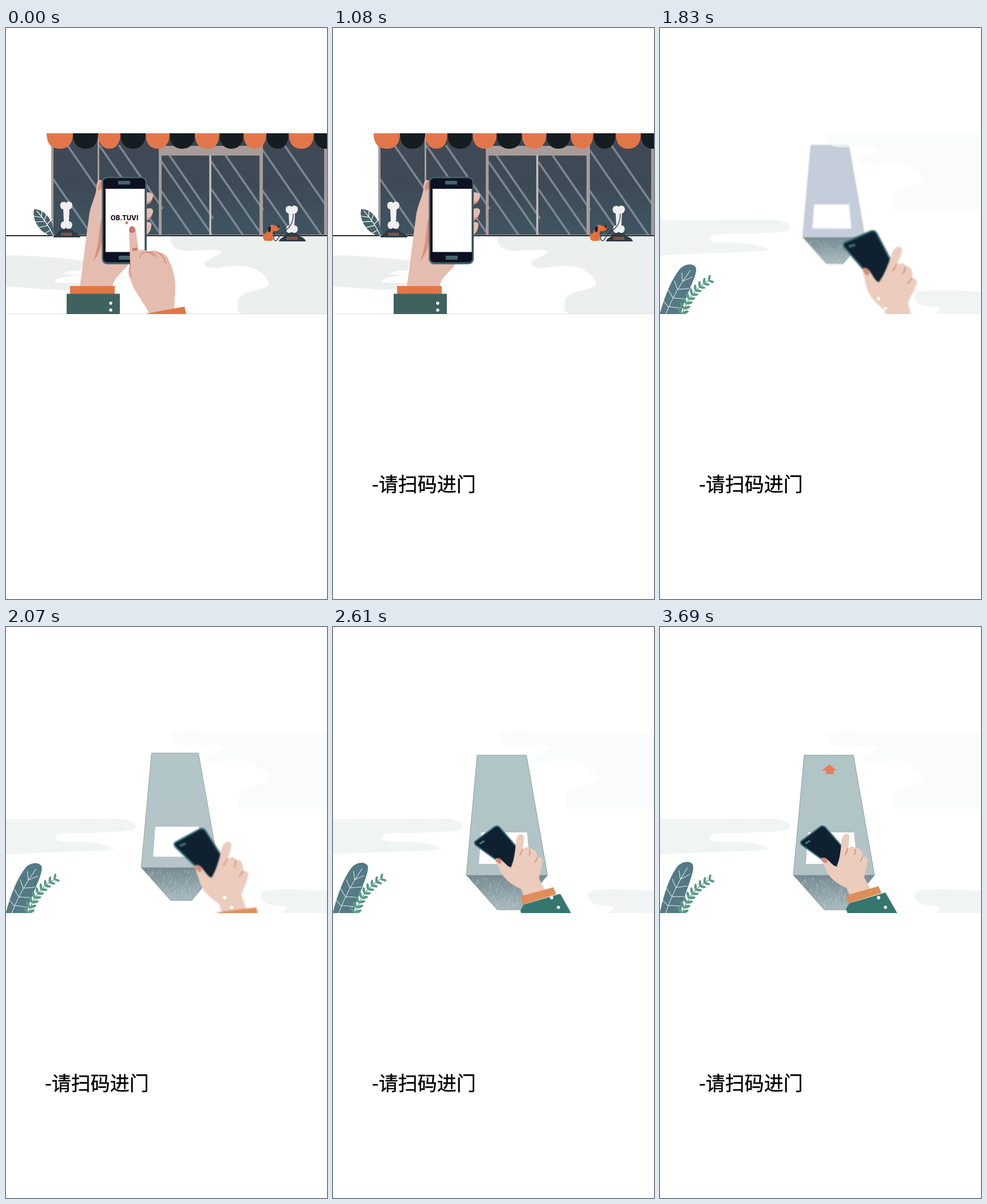
Animation, 561 px wide and 998 px high, one loop 3720 ms. Source, as an HTML page:

```html
<!DOCTYPE html>
<html lang="zh">
<head>
<meta charset="utf-8">
<style>
html, body { margin: 0; height: 100%; overflow: hidden; background: #fff; }
svg { display: block; }
.line { fill: none; stroke-linecap: round; stroke-linejoin: round; }
.skin { fill: #e5bcb0; }
.crease { stroke: #d48b76; stroke-width: 1.6; }
.cloud { fill: #eef4f3; fill-opacity: .85; }
#caption { font: 400 34px "Noto Sans CJK SC", "Noto Sans CJK", sans-serif; stroke: #000; stroke-width: .4; }
#brand { font: 800 11.5px Inter, sans-serif; text-anchor: middle; fill: #1b1214; }
.sign { font: 700 6.3px "Liberation Sans", sans-serif; text-anchor: middle; fill: #e2764a; }
</style>
</head>
<body>
<svg width="561" height="998" viewBox="0 0 561 998">
<defs>
  <clipPath id="view"><path d="M0 184H561V500H0Z"/></clipPath>
  <clipPath id="glass"><path d="M83 184H160V361H83ZM163 184H267V361H163ZM272 223H355V361H272ZM359 223H443V361H359ZM449 184H556V361H449Z"/></clipPath>
  <linearGradient id="pane" x2="0" y2="1"><stop stop-color="#414955"/><stop offset=".5" stop-color="#3d4a55"/><stop offset="1" stop-color="#3f5562"/></linearGradient>
  <linearGradient id="top" x2="0" y2="1"><stop stop-color="#b0c5c6"/><stop offset="1" stop-color="#b2c3c6"/></linearGradient>
  <linearGradient id="front" x2="0" y2="1"><stop stop-color="#768b91"/><stop offset="1" stop-color="#a4b8bd"/></linearGradient>
  <g id="stand">
    <path fill="#f0f0f2" d="M100 317C93 316 93 304 100 304Q104 303 105 306Q107 302 112 304C118 305 117 316 111 317L110 338C118 338 117 350 111 351Q107 352 105 349Q102 353 98 350C94 348 95 338 101 338Z"/>
    <path fill="#303b46" d="M83 366C84 360 91 360 92 356C95 350 100 354 104 350C110 352 116 351 119 357C123 358 129 361 130 366Z"/>
    <text class="sign" x="106" y="363">DOGS</text>
  </g>
</defs>

<g clip-path="url(#view)">
  <g id="shop">
    <path fill="#ebf0ee" d="M0 397C50 398 100 402 137 407L130 424C108 424 100 428 100 430C114 432 122 431 130 432C100 434 85 438 85 442C88 447 115 445 132 446L129 457C80 460 40 453 0 452ZM288 364C286 380 296 390 318 390C340 388 365 386 375 390C382 394 350 404 346 410C343 417 360 421 372 419C395 415 430 412 445 428C455 432 462 446 458 450C445 460 425 458 411 468C400 475 408 490 403 493L412 499H561V364Z"/>
    <path stroke="#ddd" d="M0 499.5H561"/>
    <path fill="#a79c9b" d="M79 184H561V362H79Z"/>
    <path fill="#39444f" d="M271 184H447V206H271Z"/>
    <g clip-path="url(#glass)">
      <path fill="url(#pane)" d="M79 184H561V362H79Z"/>
      <path id="shine" class="line" stroke="#7d8793" stroke-width="3.6"/>
    </g>
    <path class="line" stroke="#d0cfd0" stroke-width="1.6" d="M357 223V361"/>
    <path stroke="#25282d" stroke-width="1.8" d="M0 363H561"/>
    <g id="awning"></g>
    <g id="shrub">
      <path fill="#4a636a" d="M85 364C64 364 44 338 49 317C70 316 84 340 85 364Z"/>
      <path class="line" stroke="#fff" stroke-width="1.2" d="M54 320Q72 340 83 363M62 330L63 318M67 336L72 322M72 343L80 334M63 331L49 329M68 338L51 339M73 345L57 349M78 353L66 360"/>
    </g>
    <use href="#stand"/>
    <use href="#stand" x="394" y="7"/>
    <path class="line" stroke="#303b46" stroke-width="1.4" d="M502 325C502 350 488 352 481 360S474 374 469 371S475 358 465 352"/>
    <g id="dog">
      <path fill="#e2713f" d="M459 348C462 342 470 344 472 347C477 344 481 347 478 351C476 355 471 356 467 355C463 360 470 366 465 372H453C448 369 448 362 453 359C458 356 456 352 459 348Z"/>
      <path fill="#1b2227" d="M462 346C458 346 456 352 459 357C463 358 464 350 462 346ZM474 345C479 344 480 349 476 350Z"/>
      <path class="line" stroke="#e2713f" stroke-width="1.6" d="M454 365Q448 365 450 359"/>
    </g>

    <g class="skin">
      <path d="M240 289C249 285 259 288 257 294C256 302 250 306 240 309ZM240 319C249 313 258 314 257 321C256 329 250 333 240 336ZM240 341C248 337 256 339 254 346C253 354 250 361 240 363Z"/>
      <path d="M129 452C134 420 138 380 145 330C147 310 157 295 158 280C158 269 162 264 166 266C170 268 169 275 168 290L172 408H217C208 425 190 432 186 452Z"/>
    </g>
    <path fill="#d9917c" d="M168 334C160 345 167 372 152 408C165 394 170 372 170 350ZM246 304Q254 302 256 298Q254 306 246 309ZM246 332Q253 331 255 327Q253 334 246 337ZM162 285C158 280 163 268 168 267V280Z"/>
    <path fill="#e27746" d="M112 451H190V466H112Z"/>
    <path fill="#40625f" d="M106 464.500H199V500H106Z"/>
    <g fill="#fff"><circle cx="183" cy="481" r="2.700"/><circle cx="183" cy="493" r="2.700"/></g>
    <rect x="167.500" y="260" width="78.500" height="153" rx="9" fill="#41656a"/>
    <rect x="170" y="262.500" width="73.500" height="147" rx="7" fill="#0e1122"/>
    <path fill="#fff" d="M174 281H242.500V391.500H174Z"/>
    <path fill="#436569" d="M196 267H217V273.500H196ZM197 398H218V405H197Z"/>
    <g id="splash">
      <text id="brand" x="207" y="336">OB.TUVI</text>
      <circle cx="211" cy="340.500" r="2.500" fill="#e27746"/>
    </g>
    <g id="pointer">
      <path class="skin" d="M215 354C214 344 226 343 227 354L232 389C240 386 247 389 249 391C258 387 264 389 266 392C276 392 284 400 285 407C292 420 296 438 296 452L294 492L251 500C240 478 222 458 218 440C212 432 214 420 217 412Z"/>
      <path fill="#c9766a" d="M215.500 356C214 344 225 344 226 355Q221 361 215.500 356Z"/>
      <path fill="#d07c66" d="M220.500 385L229 383.500L230 389L221.500 390Z"/>
      <path class="line crease" d="M234 402C236 389 249 389 258 398M248 391Q258 391 263 400M264 392Q276 396 279 411M218 412Q214 424 219 434"/>
      <path fill="#e27746" d="M246 499L312 487L317 510L250 520Z"/>
    </g>
  </g>

  <g id="gate">
    <g id="machine">
      <path fill="url(#front)" d="M233 434H375L326 495H287Z"/>
      <path id="grain" class="line" stroke="#c3d0d4" stroke-width=".7" opacity=".5"/>
      <path fill="url(#top)" stroke="#7e8e94" stroke-width=".8" d="M252 224H338L375 434H233Z"/>
      <path id="tint" fill="#c5cdda" d="M252 224H338L375 434H233Z"/>
      <path fill="#fff" d="M259 359H339L344 414H255Z"/>
    </g>
    <g id="arrows" fill="#e97d5b">
      <path d="M298 281L316.500 295.500H307.500V304H290V295.500H279Z"/>
      <path d="M297 260L313 271.500H305.500V279H288V271.500H280Z"/>
      <path d="M296 240L309 251H303V257H290.500V251H282Z"/>
    </g>
    <g id="hand">
      <path fill="#0f2031" stroke="#3d7278" stroke-width="2.400" d="M247 374L280 349Q285 346 289 350L322 388L309 419Q303 421 297 416L248 381Q244 377 247 374Z"/>
      <path fill="#3d7278" d="M253 377L261.500 372L263.500 375L255 380Z"/>
      <path fill="#ecccbc" d="M281 406C282 402 288 402 292 406C298 411 303 418 309 419C313 410 316 392 317 376C317 360 330 358 331 366C331 374 330 380 328 388C333 383 339 382 341 387C348 385 354 390 354 401C361 401 365 404 362 412C362 420 358 430 357 438L370 462L332 470L326 456C308 448 296 438 291 426Z"/>
      <path fill="#d48a79" d="M281.500 406C282 402 288 402 291 406Q294 411 290 413Q284 411 281.500 406Z"/>
      <path class="line crease" stroke-width="1.200" d="M328 387Q327 392 324 398M341 388Q342 393 340 398M354 402Q353 406 350 410"/>
      <path fill="#36766f" d="M331 483L394 464L414 499L435 545H345L325 493Z"/>
      <path fill="#df8e5a" d="M325 469L382 453L387 465L330 483Z"/>
    </g>
    <g fill="#fff"><circle cx="382" cy="473" r="3"/><circle cx="394" cy="490" r="2.800"/></g>
    <path class="cloud" style="fill:#f8fbfa;fill-opacity:.65" d="M290 184C290 200 296 209 320 209C345 208 372 204 380 210C388 214 348 226 348 232C350 240 370 240 380 237C400 232 425 230 440 245C455 252 465 262 460 269C445 278 425 278 413 288C400 296 412 306 404 313L411 318H561V186Z"/>
    <path class="cloud" d="M0 336L195 335C215 335 229 343 227 350C222 358 190 358 165 359C130 362 90 356 86 367C86 378 110 374 135 375C160 376 188 383 189 388C175 393 90 392 0 398ZM561 461C530 459 460 455 448 463C440 472 450 484 465 486C475 488 488 484 490 492C488 498 478 497 484 500H561Z"/>
    <g id="leaf">
      <path fill="#547a85" d="M-2 505C8 470 20 440 36 421C45 412 60 411 64 420C66 430 55 450 45 475C40 485 38 493 36 505Z"/>
      <path class="line" stroke="#e4eeee" stroke-width="1" d="M8 505Q25 462 54 424M40 443L39 428M31 457L26 442M23 472L15 458M15 488L7 478M40 443L57 436M31 457L51 456M23 472L44 474M16 487L37 490"/>
    </g>
    <g id="sprig" fill="#5a9c86"></g>
  </g>
</g>
<text id="caption" x="68" y="810">-请扫码进门</text>
</svg>

<script>
const LOOP = 3720, SCAN = 240, CUT = 1200;
const $ = id => document.getElementById(id);
const clamp = v => Math.max(0, Math.min(1, v));
const ramp = (t, a, b) => clamp((t - a) / (b - a));
const smooth = v => v * v * (3 - 2 * v);
const show = (el, on) => el.setAttribute('visibility', on ? 'visible' : 'hidden');
const move = (el, value) => el.setAttribute('transform', value);

// Values at time t between keys of the form [time, ...values]
function track(keys, t) {
  let i = 0;
  while (i < keys.length - 2 && t > keys[i + 1][0]) i++;
  const [a, b] = [keys[i], keys[i + 1]], k = ramp(t, a[0], b[0]);
  return a.slice(1).map((v, j) => v + (b[j + 1] - v) * k);
}

// Glass reflections: start point and horizontal length
$('shine').setAttribute('d', [
  [83, 265, 60], [108, 206, 54], [163, 205, 110], [198, 206, 75], [163, 298, 42],
  [272, 234, 90], [286, 223, 75], [272, 286, 55], [359, 234, 90], [384, 223, 65], [359, 282, 55],
  [449, 214, 105], [488, 207, 75], [449, 285, 50]
].map(([x, y, w]) => `M${x} ${y}l${w} ${w * 1.45}`).join(''));

const edges = [71, 117, 161, 200, 244, 286, 330, 373, 415, 455, 494, 538, 580];
$('awning').innerHTML = edges.slice(1).map((b, i) => {
  const a = edges[i], m = (a + b) / 2;
  return `<path fill="${i % 2 ? '#161d21' : '#e2764a'}" d="M${a} 184H${b}C${b} 203 ${b - 9} 211 ${m} 211S${a} 203 ${a} 184Z"/>`;
}).join('');

let seed = 7;
const random = () => (seed = seed * 16807 % 2147483647) / 2147483647;
let grain = '';
for (let i = 0; i < 260; i++) {
  const v = random(), x = 236 + 53 * v + random() * (136 - 101 * v);
  grain += `M${x} ${437 + 52 * v}l${random() * 2 - 1} ${2 + random() * 3}`;
}
$('grain').setAttribute('d', grain);

let sprig = '<path class="line" stroke="#5a9c86" stroke-width="1.3" d="M38 503Q50 462 86 442"/>';
for (let i = 0; i < 9; i++) {
  const k = i / 8, q = 1 - k;
  const x = 38 * q * q + 100 * k * q + 86 * k * k, y = 500 * q * q + 924 * k * q + 442 * k * k;
  const angle = -72 + 45 * k, size = 6.5 - 1.5 * k;
  for (const side of [-48, 48])
    sprig += `<ellipse cx="${size}" rx="${size}" ry="${size * .42}" transform="translate(${x} ${y}) rotate(${angle + side})"/>`;
}
$('sprig').innerHTML = sprig;

// time, x, y, angle, scale, blur
const handKeys = [
  [1200, 430, 600, 24, 1.6, 1], [1410, 376, 367, 16, 1.54, 0], [1530, 376, 367, 16, 1.54, 0],
  [1830, 394, 429, 13.5, 1.2, .8], [2370, 338, 414, 2.4, 1.11, .6], [2640, 315, 404, 0, 1, 0]
];
const machineKeys = [[1680, .6, 2], [1830, .765, 1.6], [2130, 1, 0]];
const pointerKeys = [[0, 0, 0], [90, 0, 0], [150, 0, -2], [240, 0, 0], [510, 3, 90], [660, 5, 160]];
const arrowKeys = [
  [[2610, 0], [2730, 1], [2880, 1], [3210, 0]],
  [[2760, 0], [2880, .9], [3240, .9], [3540, 0]],
  [[2910, 0], [3030, 1]]
];

function draw(t) {
  const indoors = t >= CUT;
  show($('shop'), !indoors);
  show($('gate'), indoors);
  show($('caption'), t >= SCAN);
  show($('splash'), t < SCAN);

  if (!indoors) {
    move($('pointer'), `translate(${track(pointerKeys, t)})`);
    move($('shrub'), `rotate(${Math.sin(t / 160) * .8} 85 364)`);
    return;
  }

  const [x, y, angle, scale, blur] = track(handKeys, t);
  move($('hand'), `translate(${x} ${y}) rotate(${angle}) scale(${scale}) translate(-315 -404)`);
  $('hand').style.filter = blur > .05 ? `blur(${blur}px)` : 'none';

  const [size, haze] = track(machineKeys, t);
  move($('machine'), `translate(303 143) scale(${size}) translate(-303 -143)`);
  $('machine').style.filter = haze > .05 ? `blur(${haze}px)` : 'none';
  $('machine').style.opacity = ramp(t, 1650, 1770);
  $('tint').style.opacity = 1 - smooth(ramp(t, 1800, 2130));

  [...$('arrows').children].forEach((arrow, i) => arrow.style.opacity = track(arrowKeys[i], t)[0]);
  const sway = ramp(t, 1470, LOOP);
  move($('leaf'), `rotate(${-4.5 * sway} 8 500)`);
  move($('sprig'), `rotate(${-2 * Math.sin(sway * Math.PI)} 40 500)`);
}

function tick() {
  draw(performance.now() % LOOP);
  requestAnimationFrame(tick);
}
tick();
</script>
</body>
</html>
```
